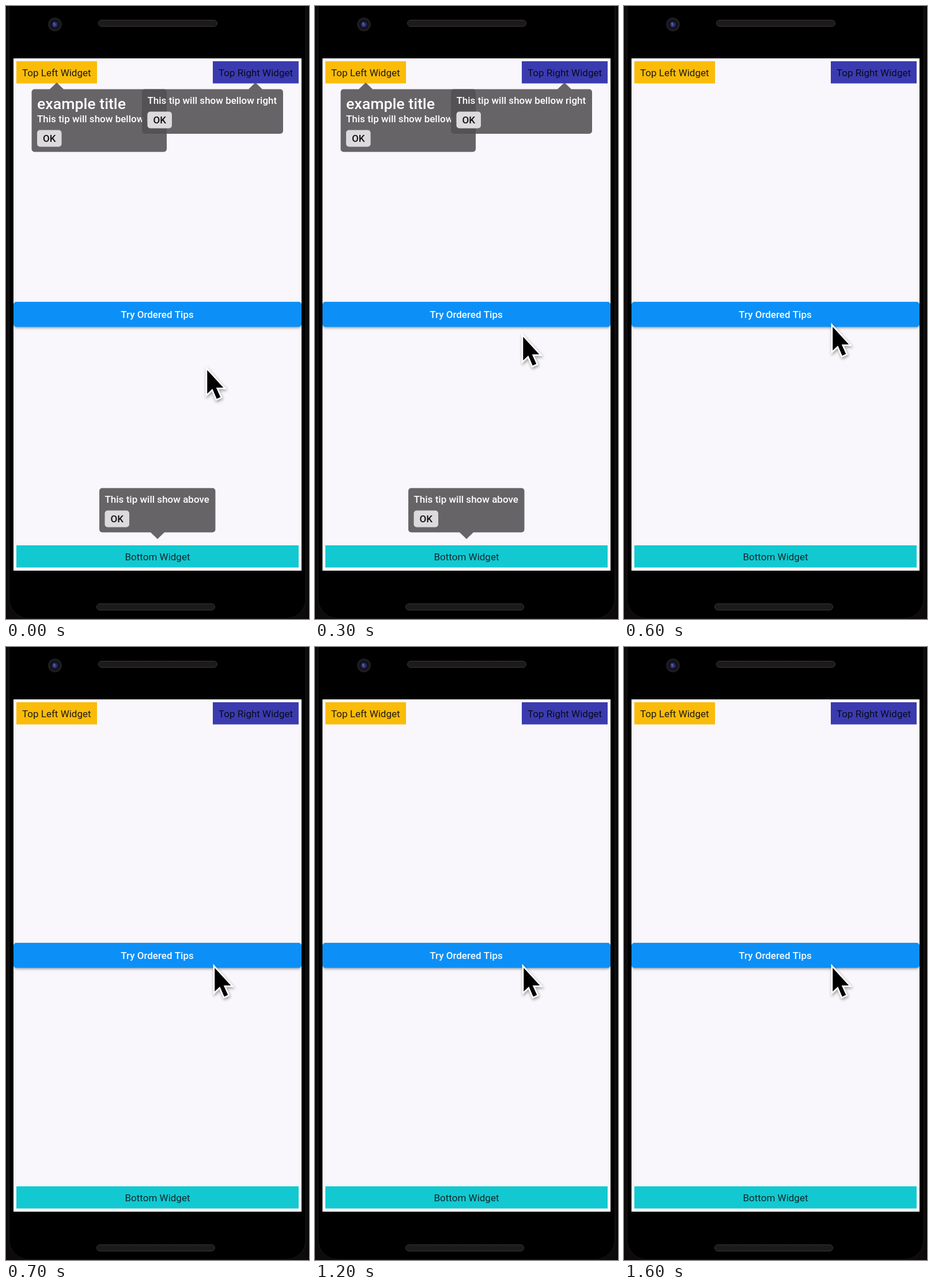
Write an HTML page with a canvas that moves like this. It is 526x1065 px and loops after 1.7 s.

```html
<!DOCTYPE html>
<html lang="en">
<head>
<meta charset="utf-8">
<title>Ordered tips</title>
<style>
html, body { margin: 0; width: 100%; height: 100%; overflow: hidden; background: #000; }
canvas { display: block; }
</style>
</head>
<body>
<canvas id="stage" width="526" height="1065"></canvas>
<script>
const ctx = document.getElementById('stage').getContext('2d');
const LOOP = 1700, STEP = 100, TIPS_END = 600, MOVE_END = 500;
const TIP_FILL = 'rgba(82,80,83,0.88)';

function rect(x, y, w, h, fill) {
  ctx.fillStyle = fill;
  ctx.fillRect(x, y, w, h);
}

function round(x, y, w, h, r, fill, stroke) {
  ctx.beginPath();
  ctx.roundRect(x, y, w, h, r);
  if (fill) { ctx.fillStyle = fill; ctx.fill(); }
  if (stroke) { ctx.strokeStyle = stroke; ctx.lineWidth = 1; ctx.stroke(); }
}

function text(str, x, y, fill, { size = 17, weight = 400, align = 'left' } = {}) {
  ctx.font = `${weight} ${size}px Roboto, sans-serif`;
  ctx.textAlign = align;
  ctx.fillStyle = fill;
  ctx.fillText(str, x, y);
}

function shadow(color, blur, dx, dy) {
  ctx.shadowColor = color;
  ctx.shadowBlur = blur;
  ctx.shadowOffsetX = dx;
  ctx.shadowOffsetY = dy;
}

function disc(x, y, r, fill) {
  ctx.beginPath();
  ctx.arc(x, y, r, 0, Math.PI * 2);
  ctx.fillStyle = fill;
  ctx.fill();
}

function speaker(x, y, w) {
  round(x + 0.5, y + 0.5, w - 1, 11, 5.5, '#1b191a', '#393738');
  ctx.fillStyle = '#252324';
  for (let row = 0; row < 3; row++) {
    for (let i = x + 6; i < x + w - 6; i += 3) ctx.fillRect(i, y + 3 + row * 2.5, 1, 1);
  }
}

function phone() {
  rect(0, 0, 526, 1065, '#0d0b0c');
  round(5.5, -30, 515, 1094, [0, 0, 34, 34], '#000', '#1a1819');
  rect(0, 0, 1, 1065, '#050404');
  rect(524, 0, 2, 1065, '#050404');

  disc(85, 32, 12, '#1e1c1f');
  disc(85, 32, 8, '#0f0e16');
  const lens = ctx.createRadialGradient(84, 33, 0, 85, 32, 7);
  lens.addColorStop(0, '#5b66b4');
  lens.addColorStop(0.4, '#2b3070');
  lens.addColorStop(1, '#10101f');
  disc(85, 32, 6, lens);
  disc(83.5, 30, 1, '#8d96cc');

  speaker(160, 24, 207);
  speaker(157, 1038, 206);
}

function app() {
  rect(13, 91, 500, 890, '#fff');
  rect(14, 92, 498, 885, '#f9f7fb');

  rect(18, 96, 140, 38.5, '#fabc09');
  text('Top Left Widget', 28, 122, '#1f1a14');
  rect(359, 96, 149, 38.5, '#3b3bb0');
  text('Top Right Widget', 369, 122, '#0b0a1c');
  rect(18, 937, 490, 38.5, '#12c9d1');
  text('Bottom Widget', 263, 963, '#10282c', { align: 'center' });

  ctx.save();
  shadow('rgba(0,0,0,0.35)', 4, 0, 2);
  round(13, 514, 500, 43.5, 5, '#0c90f7');
  ctx.restore();
  text('Try Ordered Tips', 262.5, 542, '#f4faff', { weight: 500, align: 'center' });
}

// Bubble with a pointer at px, above the box or below it.
function tip(x, y, w, h, px, above, message, title) {
  const edge = above ? y : y + h;
  const peak = above ? edge - 11.5 : edge + 11.5;
  ctx.beginPath();
  ctx.roundRect(x, y, w, h, 5);
  if (above) {
    ctx.moveTo(px - 12, edge);
    ctx.lineTo(px, peak);
    ctx.lineTo(px + 12, edge);
  } else {
    ctx.moveTo(px + 12, edge);
    ctx.lineTo(px, peak);
    ctx.lineTo(px - 12, edge);
  }
  ctx.fillStyle = TIP_FILL;
  ctx.fill();

  const left = x + 9.5;
  let base = y + 25.5;
  if (title) {
    text(title, left, y + 34, '#fff', { size: 26.7, weight: 500 });
    base = y + 57.5;
  }
  text(message, left, base, '#fff', { weight: 500 });
  round(left, base + 13.5, 42.5, 29, 5, '#dcdadd');
  text('OK', left + 21.25, base + 34, '#111', { weight: 500, align: 'center' });
}

function tips() {
  tip(44.5, 144.5, 234.5, 109, 88, true, 'This tip will show bellow left', 'example title');
  tip(236, 144.5, 245, 77.5, 433, true, 'This tip will show bellow right');
  tip(162, 837.5, 201.5, 77, 263, false, 'This tip will show above');
}

function cursor(x, y) {
  const arrow = new Path2D('M0 0V41L9 32.5L16.5 50L23 47L15.5 30.5H28Z');
  ctx.save();
  ctx.translate(x, y);
  ctx.strokeStyle = '#fff';
  ctx.lineWidth = 5.4;
  ctx.lineJoin = 'miter';
  shadow('rgba(0,0,0,0.38)', 5, 1, 2.5);
  ctx.stroke(arrow);
  shadow('transparent', 0, 0, 0);
  ctx.fillStyle = '#000';
  ctx.fill(arrow);
  ctx.restore();
}

const easeOut = (p, power) => 1 - Math.pow(1 - p, power);

function draw(now) {
  const t = Math.floor((now % LOOP) / STEP) * STEP;
  const p = Math.min(1, t / MOVE_END);
  phone();
  app();
  if (t < TIPS_END) tips();
  cursor(349.3 + 13 * easeOut(p, 2.8), 632.5 - 75 * easeOut(p, 1.6));
}

const start = performance.now();
function tick() {
  draw(performance.now() - start);
  requestAnimationFrame(tick);
}
tick();
</script>
</body>
</html>
```
